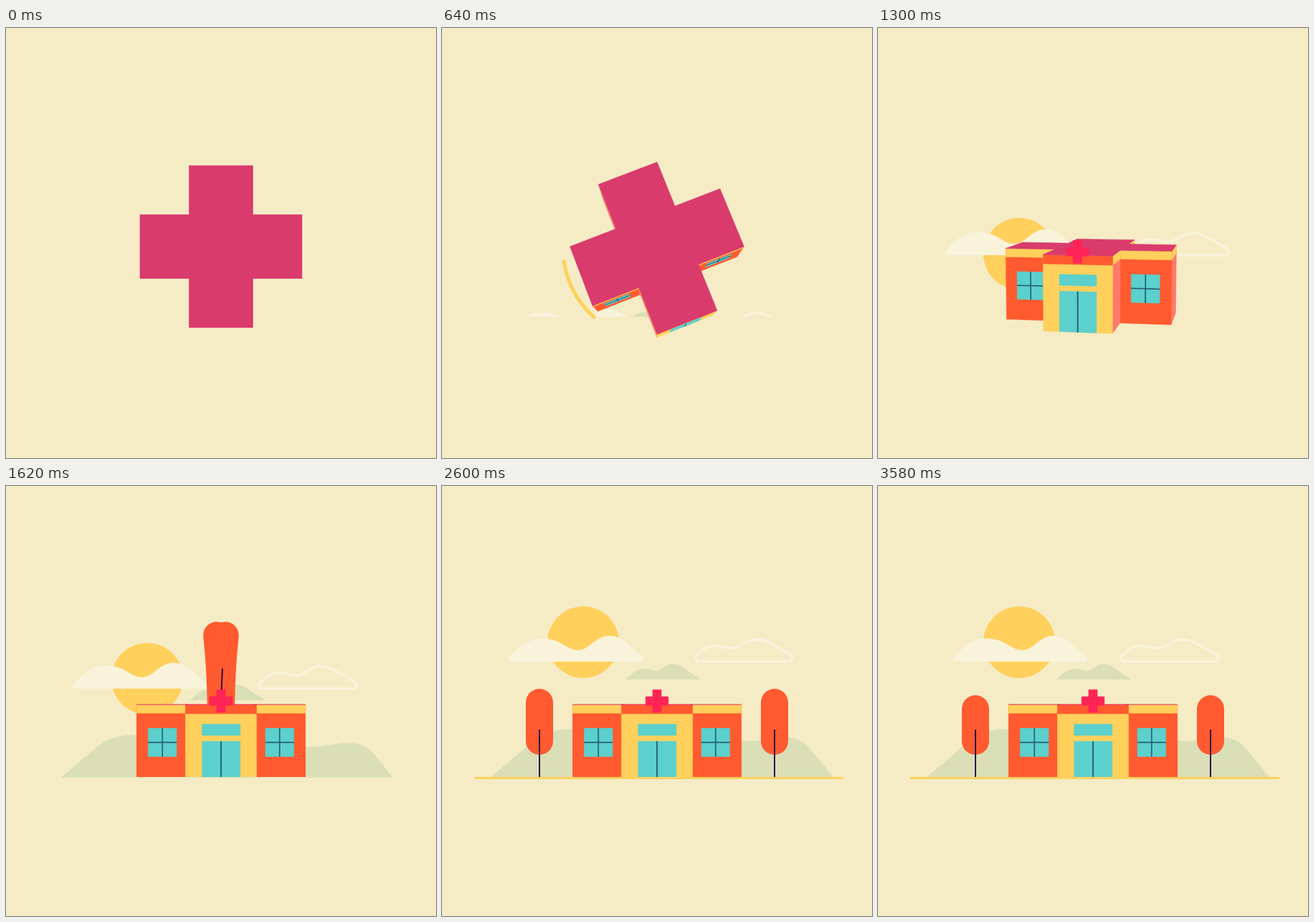
An HTML page with a canvas for the animation above (3.6 s loop, 600 px wide and 600 px high).

```html
<!DOCTYPE html>
<html lang="en">
<head>
<meta charset="utf-8">
<title>Hospital</title>
<style>
  html, body { margin: 0; width: 100%; height: 100%; overflow: hidden; background: #f5ecc6; }
  canvas { display: block; width: 600px; height: 600px; }
</style>
</head>
<body>
<canvas id="stage" width="600" height="600"></canvas>
<script>
const ctx = document.getElementById('stage').getContext('2d');
const LOOP = 3600, RAD = Math.PI / 180;
const color = {
  sky: '#f5ecc6', roof: '#d93b6d', orange: '#ff5a30', coral: '#ff7a6b', yellow: '#ffd05c',
  glass: '#5bd0cc', bar: '#24506f', sign: '#ff2456', cloud: '#f9f3dc', hill: '#dadfb7', trunk: '#2f0a45'
};

// Smooth monotone curve through [time, value] keys.
function track(...keys) {
  const slope = i => (keys[i + 1][1] - keys[i][1]) / (keys[i + 1][0] - keys[i][0]);
  const tangent = keys.map((_, i) => {
    if (!i || i === keys.length - 1) return 0;
    const a = slope(i - 1), b = slope(i);
    return a * b <= 0 ? 0 : 2 * a * b / (a + b);
  });
  return t => {
    if (t <= keys[0][0]) return keys[0][1];
    const i = keys.findIndex(k => k[0] > t) - 1;
    if (i < 0) return keys[keys.length - 1][1];
    const [t0, v0] = keys[i], [t1, v1] = keys[i + 1];
    const d = t1 - t0, u = (t - t0) / d, w = 1 - u;
    return v0 * w * w * (1 + 2 * u) + v1 * u * u * (3 - 2 * u)
      + d * u * w * (tangent[i] * w - tangent[i + 1] * u);
  };
}

const yaw = track([0, 0], [340, 20], [640, -21.2], [980, -306.4], [1300, -350.1], [1620, -360]);
const pitch = track([440, 90], [640, 81], [980, 27.3], [1300, 5.7], [1600, 0]);
const signSize = track([680, 0], [900, 1]);
const floorY = track([1300, 432], [1600, 406]);
const arcHead = track([400, 270], [540, 188], [640, 132], [980, -104], [1200, -150]);
const arcTail = track([440, 270], [540, 260], [640, 172], [980, -37], [1200, -150]);
const sink = track([520, 202], [640, 184], [980, 120], [1300, 72], [1940, 15], [2500, 0]);
const hillSink = track([1300, 72], [1620, 8], [1940, 3], [2200, 0]);
const drift = track([2560, 0], [3600, 1]);
const groundHalf = track([1700, 0], [1940, 128.5], [2400, 257.5]);

// Distances along the tree path, measured back from the ground.
const crownLead = track([1480, 720], [1620, 560], [1940, 150], [2200, 50]);
const crownTrail = track([1560, 770], [1940, 250], [2300, 108], [2600, 104], [3000, 94], [3600, 95]);
const trunkLead = track([1480, 710], [1940, 141], [2200, 0]);
const trunkTrail = track([1620, 740], [1940, 268], [2300, 66]);

const treePath = new Path2D('M136 406V245C136 55 300 -90 300 330');
const cloud = new Path2D('M96 245Q90 243 97 236C112 219 128 211 145 213C168 215 174 229 190 229C206 229 214 209 233 209C252 209 260 222 275 234Q284 242 278 245Z');
const outlineCloud = new Path2D('M358 245C351 245 353 237 358 234C366 227 372 222 382 223C396 224 398 228 408 226C420 224 424 214 440 214C452 214 462 222 484 234C492 239 490 245 484 245Z');
const smallCloud = new Path2D('M257 270C264 262 272 255 282 255C292 255 294 259 302 257C310 254 314 248 322 248C334 248 342 259 356 266Q361 269 360 270Z');
const hills = new Path2D('M67 407C90 388 108 372 122 360C150 336 178 338 200 341L400 352C425 358 440 356 455 353C470 350 490 348 505 358C520 372 530 388 547 407Z');

function clipAbove(y, draw) {
  ctx.save();
  ctx.beginPath();
  ctx.rect(0, 0, 600, y);
  ctx.clip();
  draw();
  ctx.restore();
}

function fillShifted(path, dx, dy, fill) {
  ctx.save();
  ctx.translate(dx, dy);
  ctx.fillStyle = fill;
  ctx.fill(path);
  ctx.restore();
}

function drawSky(t) {
  const k = sink(t), d = drift(t);
  clipAbove(403, () => {
    ctx.fillStyle = color.yellow;
    ctx.beginPath();
    ctx.arc(197, 218 + 1.35 * k, 50, 0, 7);
    ctx.fill();
    fillShifted(cloud, 11.5 * d, k, color.cloud);
    fillShifted(smallCloud, -7.5 * d, 0.77 * k, color.hill);
    ctx.translate(-14.5 * d, k);
    ctx.strokeStyle = color.cloud;
    ctx.lineWidth = 3.5;
    ctx.stroke(outlineCloud);
  });
  clipAbove(407, () => fillShifted(hills, 0, hillSink(t), color.hill));
}

function strokeSpan(from, to, width, cap, stroke) {
  ctx.lineCap = cap;
  ctx.lineWidth = width;
  ctx.strokeStyle = stroke;
  ctx.setLineDash([Math.max(to - from, 0.1), 3000]);
  ctx.lineDashOffset = -from;
  ctx.stroke(treePath);
}

function drawTrees(t) {
  if (t < 1480) return;
  for (const side of [1, -1]) {
    ctx.save();
    ctx.translate(300, 0);
    ctx.scale(side, 1);
    ctx.translate(-300, 0);
    strokeSpan(crownLead(t), crownTrail(t), 38, 'round', color.orange);
    strokeSpan(trunkLead(t), trunkTrail(t), 2, 'butt', color.trunk);
    ctx.restore();
  }
}

// Plan of the building: a plus sign, starting at the entrance.
const A = 44.5, B = 113, HEIGHT = 98, BAND = 11.5, EYE = 1100;
const plan = [[-A, B], [A, B], [A, A], [B, A], [B, -A], [A, -A],
  [A, -B], [-A, -B], [-A, -A], [-B, -A], [-B, A], [-A, A]];

function makeView(t) {
  const a = yaw(t) * RAD, p = pitch(t) * RAD;
  const sin = Math.sin(p), cos = Math.cos(p);
  const spin = (x, z) => [x * Math.cos(a) - z * Math.sin(a), x * Math.sin(a) + z * Math.cos(a)];
  const project = (x, z, drop) => {
    const f = EYE / (EYE - z * cos + drop * sin);
    return [300 + f * x, 305 + f * (z * sin + drop * cos), f];
  };
  return { sin, spin, project, point: (x, z, drop) => project(...spin(x, z), drop) };
}

function polygon(points, fill) {
  ctx.beginPath();
  points.forEach(p => ctx.lineTo(p[0], p[1]));
  ctx.closePath();
  ctx.fillStyle = ctx.strokeStyle = fill;
  ctx.lineWidth = 0.6;
  ctx.fill();
  ctx.stroke();
}

function drawWall(view, i) {
  const [x0, z0] = plan[i], [x1, z1] = plan[(i + 1) % 12];
  const length = Math.hypot(x1 - x0, z1 - z0);
  const at = (u, drop) => view.point(x0 + (x1 - x0) * u / length, z0 + (z1 - z0) * u / length, drop);
  const panel = (u0, v0, u1, v1, fill) =>
    polygon([at(u0, v0), at(u1, v0), at(u1, v1), at(u0, v1)], fill);
  const a = at(0, 0), b = at(length, 0), c = at(length, HEIGHT);
  if ((b[0] - a[0]) * (c[1] - b[1]) <= (b[1] - a[1]) * (c[0] - b[0])) return;

  const entrance = i === 0;
  panel(0, 0, length, HEIGHT, entrance ? color.yellow : i % 2 ? color.coral : color.orange);
  panel(0, 0, length, BAND, entrance ? color.orange : color.yellow);
  if (entrance) {
    panel(21, 24.5, 68.5, 38.5, color.glass);
    panel(21, 46, 68.5, HEIGHT, color.glass);
    panel(44, 46, 45, HEIGHT, color.bar);
  } else if (i === 2 || i === 10) {
    const u = i === 2 ? 15 : 15.5;
    panel(u, 31.7, u + 38, 69.6, color.glass);
    panel(u + 18.6, 31.7, u + 19.4, 69.6, color.bar);
    panel(u, 50.2, u + 38, 51, color.bar);
  }
}

function drawSign(view, size) {
  if (size <= 0) return;
  const k = 14.2 / B * size, arm = 5.4 / A * size;
  const scale = v => Math.abs(v) === B ? v * k : v * arm;
  polygon(plan.map(([x, y]) => view.point(scale(x), B + 1, scale(y) - 4.5)), color.sign);
}

function drawBuilding(t) {
  const view = makeView(t);
  const middle = i => {
    const [x0, z0] = plan[i], [x1, z1] = plan[(i + 1) % 12];
    return view.spin((x0 + x1) / 2, (z0 + z1) / 2)[1];
  };
  const facing = middle(0) > 0;
  clipAbove(floorY(t), () => {
    if (!facing) drawSign(view, signSize(t));
    plan.map((_, i) => i).sort((i, j) => middle(i) - middle(j)).forEach(i => drawWall(view, i));
    polygon(plan.map(([x, z]) => view.point(x, z, 0)), color.roof);
    if (facing) drawSign(view, signSize(t));
  });

  const head = arcHead(t), tail = arcTail(t);
  if (tail - head < 0.5) return;
  ctx.fillStyle = color.yellow;
  ctx.beginPath();
  for (let a = head; a <= tail; a += 0.5) {
    const [x, y, f] = view.project(131 * Math.cos(a * RAD), 131 * Math.sin(a * RAD), 0);
    ctx.moveTo(x + 2.5 * f, y);
    ctx.ellipse(x, y, 2.5 * f, 2.5 * f * view.sin, 0, 0, 2 * Math.PI);
  }
  ctx.fill();
}

function drawGround(t) {
  const half = groundHalf(t);
  ctx.fillStyle = color.yellow;
  ctx.fillRect(302.5 - half, 406, 2 * half, 3);
}

function render(now) {
  const t = now % LOOP;
  ctx.fillStyle = color.sky;
  ctx.fillRect(0, 0, 600, 600);
  drawSky(t);
  drawTrees(t);
  drawBuilding(t);
  drawGround(t);
}

const start = performance.now();
function tick() {
  render(performance.now() - start);
  requestAnimationFrame(tick);
}
tick();
</script>
</body>
</html>
```
